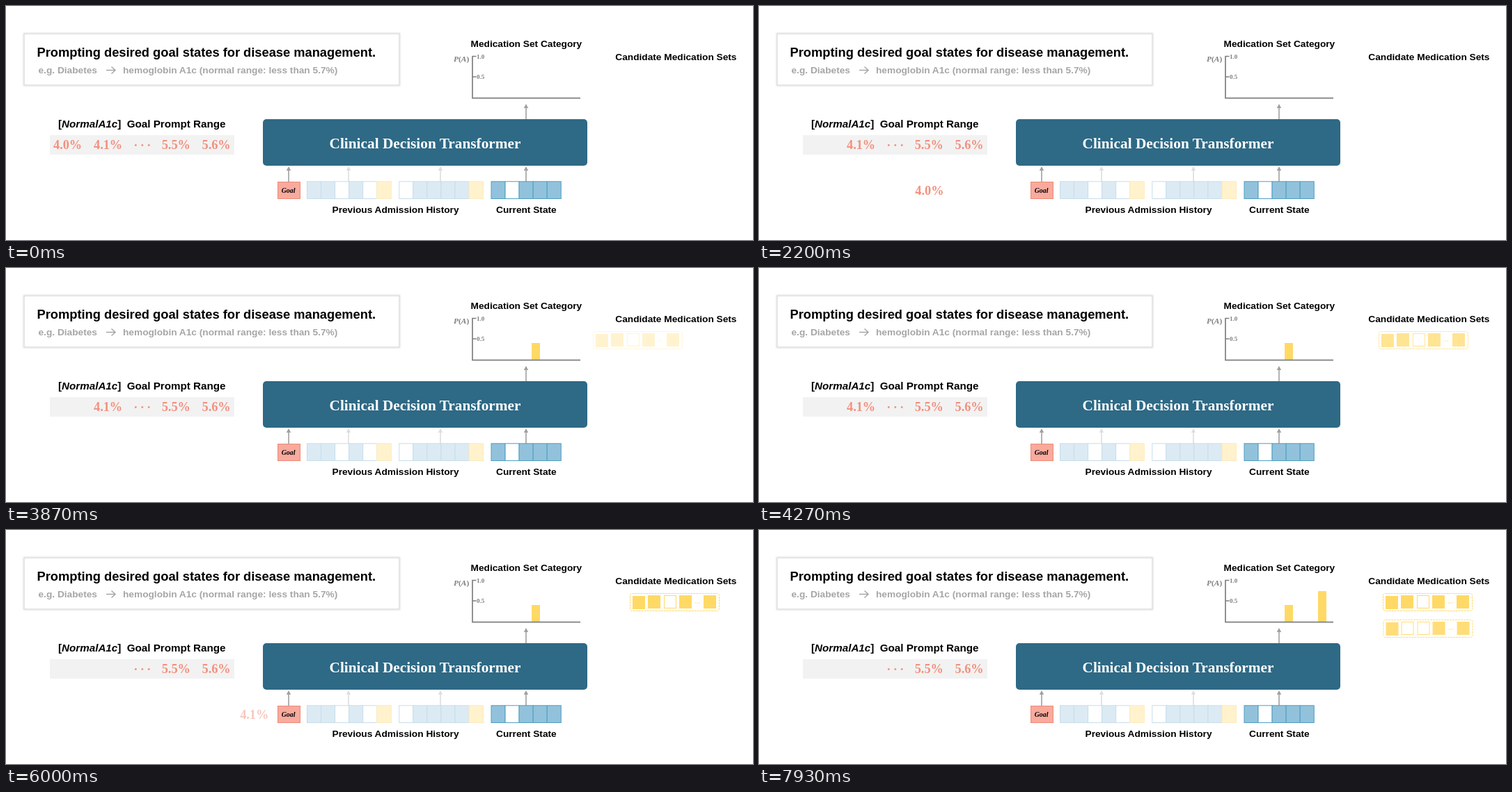
Animation of 1073x337 px, one loop 8000 ms. Source, as an HTML page:

```html
<!DOCTYPE html>
<html lang="en">
<head>
<meta charset="utf-8">
<title>Goal prompting</title>
<style>
  html, body { margin: 0; width: 100%; height: 100%; overflow: hidden; background: #fff; }
  svg { display: block; width: 1073px; height: 337px; }
  text { white-space: pre; }
  .sans { font: bold 13.7px "Liberation Sans", Arial, sans-serif; }
  .serif { font: bold 18.3px "Liberation Serif", "Times New Roman", serif; }
  .chip { fill: #f2907e; }
  .note { fill: #a6a6a6; }
  .small { font-size: 9.1px; fill: #7f7f7f; }
</style>
</head>
<body>
<svg viewBox="0 0 1073 337" xmlns="http://www.w3.org/2000/svg">
  <defs>
    <filter id="soft" x="-5%" y="-20%" width="110%" height="140%"><feGaussianBlur stdDeviation="0.9"/></filter>
  </defs>

  <rect x="26" y="40" width="539" height="74" fill="none" stroke="#d9d9d9" stroke-width="2.4" filter="url(#soft)"/>
  <rect x="27" y="41" width="537" height="72" fill="#fff"/>
  <text class="sans" x="44.5" y="73" style="font-size:18.3px">Prompting desired goal states for disease management.</text>
  <g class="note">
    <text class="sans" x="46.5" y="97">e.g. Diabetes</text>
    <text class="sans" x="168" y="97">hemoglobin A1c (normal range: less than 5.7%)</text>
    <path d="M144 92.5H157M151.5 87.5L157 92.5L151.5 97.5" fill="none" stroke="#a6a6a6" stroke-width="1.4"/>
  </g>

  <text class="sans" x="75" y="175" style="font-size:15.2px">[<tspan font-style="italic">NormalA1c</tspan>]  Goal Prompt Range</text>
  <rect x="63" y="186" width="265" height="28" fill="#f2f2f2"/>
  <g class="serif chip">
    <circle cx="186.3" cy="200.5" r="1.4"/><circle cx="195.8" cy="200.5" r="1.4"/><circle cx="205.2" cy="200.5" r="1.4"/>
    <text x="223.7" y="206">5.5%</text>
    <text x="281.5" y="206">5.6%</text>
  </g>
  <g id="chips" class="serif chip"></g>

  <g id="bars" fill="#ffd966"></g>
  <path d="M675.5 72.5H670V132.7H825M670 102H675.5" fill="none" stroke="#7f7f7f" stroke-width="1.7"/>
  <text class="sans" x="667.5" y="59">Medication Set Category</text>
  <text class="serif" x="643" y="79.5" style="font-size:11.4px" fill="#7f7f7f"><tspan font-style="italic">P</tspan>(<tspan font-style="italic">A</tspan>)</text>
  <text class="serif small" x="676" y="76">1.0</text>
  <text class="serif small" x="676" y="105">0.5</text>
  <text class="sans" x="875.3" y="78">Candidate Medication Sets</text>
  <g id="sets"></g>

  <rect x="369" y="163" width="466" height="67" rx="5" fill="#2e6985"/>
  <text class="serif" x="602" y="205" text-anchor="middle" fill="#fff" style="font-size:21.3px">Clinical Decision Transformer</text>

  <g id="arrows"></g>
  <g id="cells"></g>
  <rect x="390.5" y="253.5" width="32" height="24" fill="#f8aa9d" stroke="#ee8a78"/>
  <text class="serif" x="405.5" y="269" text-anchor="middle" font-style="italic" style="font-size:9.9px;font-style:italic">Goal</text>
  <text class="sans" x="468.5" y="298">Previous Admission History</text>
  <text class="sans" x="704" y="298">Current State</text>
</svg>
<script>
const LOOP = 8000;
const YELLOW = '#ffd966';
const $ = id => document.getElementById(id);

function add(parent, tag, attrs) {
  const el = document.createElementNS('http://www.w3.org/2000/svg', tag);
  set(el, attrs);
  parent.append(el);
  return el;
}
function set(el, attrs) {
  for (const key in attrs) el.setAttribute(key, attrs[key]);
}
const progress = (t, start, length) => Math.min(1, Math.max(0, (t - start) / length));
const ease = u => u < 0.5 ? 4 * u ** 3 : 1 - 4 * (1 - u) ** 3;

function arrow(x, tip, tail, color) {
  add($('arrows'), 'path', { d: `M${x} ${tail}V${tip + 4}`, stroke: color, 'stroke-width': 1.6 });
  add($('arrows'), 'path', { d: `M${x - 3.2} ${tip + 6}L${x} ${tip}L${x + 3.2} ${tip + 6}Z`, fill: color });
}
arrow(406, 231, 253, '#a0a0a0');
arrow(492, 231, 253, '#dedede');
arrow(624, 231, 253, '#dedede');
arrow(747, 231, 253, '#a0a0a0');
arrow(747, 141, 163, '#a0a0a0');

// Pattern letters: b = blue, w = white, y = yellow
function strip(x, pattern, blue, line) {
  [...pattern].forEach((c, i) => add($('cells'), 'rect', {
    x: x + i * 20.05, y: 252.8, width: c === 'y' ? 20.6 : 20.05, height: 24.7,
    fill: { b: blue, w: '#fff', y: '#fff2cc' }[c],
    stroke: c === 'y' ? '#fdecc0' : line
  }));
}
strip(432.5, 'bbwbwy', '#dceaf4', '#c6deea');
strip(564.8, 'wbbbby', '#dceaf4', '#c6deea');
strip(697, 'bwbbb', '#92c2db', '#4f9fc2');

// A chip drops, turns a rounded corner and slides behind the goal box.
const DROP = 66, RADIUS = 55;
function chipOffset(s) {
  const down = DROP - RADIUS, arc = RADIUS * Math.PI / 2;
  if (s < down) return [0, s];
  if (s > down + arc) return [RADIUS + s - down - arc, DROP];
  const a = (s - down) / RADIUS;
  return [RADIUS * (1 - Math.cos(a)), down + RADIUS * Math.sin(a)];
}
function makeChip(label, x, start) {
  const el = add($('chips'), 'text', { x, y: 206 });
  el.textContent = label;
  const length = DROP - 2 * RADIUS + RADIUS * Math.PI / 2 + 385.5 - x;
  return t => {
    const [dx, dy] = chipOffset(ease(progress(t, start, 2000)) * length);
    set(el, { transform: `translate(${dx} ${dy})`, opacity: 1 - progress(t, start + 1065, 500) });
  };
}

function makeBar(x, height, start) {
  const body = add($('bars'), 'rect', { x, width: 12 });
  const edge = add($('bars'), 'rect', { x, width: 12, opacity: 0.4 });
  return t => {
    const h = height * progress(t, start, 500);
    const soft = h > 0 ? Math.min(2, height - h) : 0;
    set(body, { y: 132 - h, height: h });
    set(edge, { y: 132 - h - soft, height: soft });
  };
}

function makeSet(x, y, pattern, start) {
  const g = add($('sets'), 'g', {});
  add(g, 'rect', { x: 0.5, y: 0.5, width: 128, height: 25, rx: 3, fill: 'none', stroke: YELLOW, 'stroke-dasharray': '3 1' });
  [4, 26, 49, 71, 106].forEach((cx, i) => add(g, 'rect', {
    x: cx + 0.5, y: (i ? 3 : 4) + 0.5, width: 17, height: 18,
    fill: pattern[i] === 'y' ? YELLOW : '#fff', stroke: YELLOW
  }));
  for (const dx of [94.5, 97, 99.5]) add(g, 'circle', { cx: dx, cy: 14, r: 0.7, fill: YELLOW });
  return t => {
    const u = progress(t, start, 1000);
    set(g, { transform: `translate(${x - 60 * (1 - ease(u))} ${y})`, opacity: u });
  };
}

const parts = [
  makeChip('4.0%', 68, 1165),
  makeChip('4.1%', 126, 4690),
  makeBar(755, 24, 3033),
  makeBar(803, 44, 6567),
  makeSet(896, 91, 'yywyy', 3565),
  makeSet(897, 129, 'ywwyy', 7055)
];

function draw() {
  const t = performance.now() % LOOP;
  parts.forEach(update => update(t));
  requestAnimationFrame(draw);
}
draw();
</script>
</body>
</html>
```
